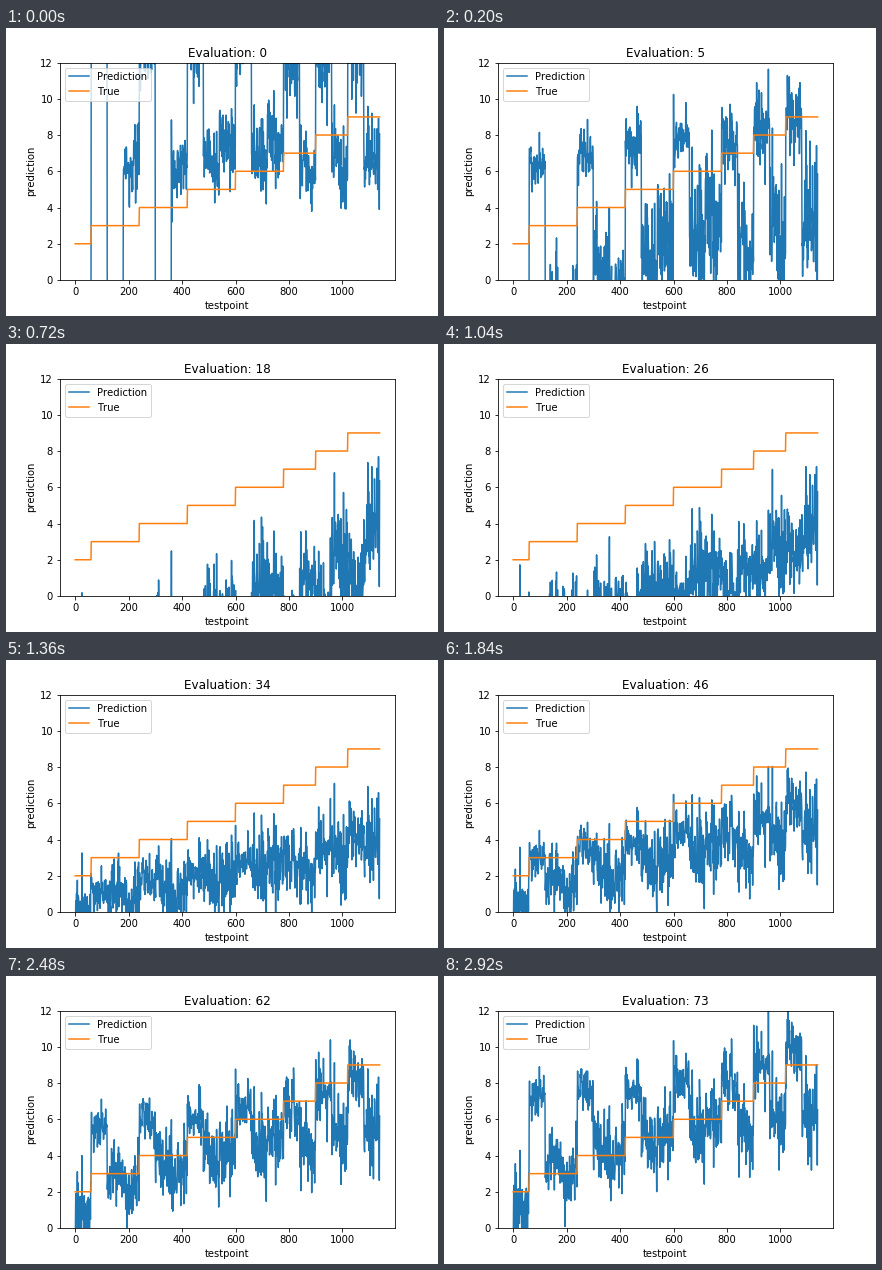
Animation, 432 px wide and 288 px high, one loop 2960 ms. Source, as a matplotlib script:

```python
import numpy as np
import matplotlib.pyplot as plt
from matplotlib.animation import FuncAnimation

EVALS, STEP_MS = 74, 40
SEG, N = 60, 1140
STARTS = np.array([0, 60, 240, 420, 600, 780, 900, 1020])
PEAKS = [25, 98, 360, 600, 670, 955, 1095, 1135]
DIPS = [580, 750, 885, 995]

x = np.arange(N)
level = np.searchsorted(STARTS, x, side='right') - 1
truth = level + 2
d = level - 1
since = x - STARTS[level]
fresh = (since < SEG) & (level > 0)     # first stretch after each step
stuck = ~fresh & (since < 2 * SEG) & (level < 3)
drift = np.where(level < 3, 1, -1) * ((since % 120) / 120 - .5) * ~fresh

# Stages of training: mean after a step, mean elsewhere, drift, noise gains
STAGES = [
    (12.8 + 2 * (d == 0), np.where(stuck, -5, 7), 2, 1.5, .9),
    (6.5 + .4 * d, 3.8 - 6 * .6 ** d, 2.5, 1.1, 1.6),
    (-6 + 1.1 * d, -3 + 1.05 * d, -1, 1.3, 1.25),
    (1.2 + .5 * d, .9 + .5 * d, 1, .9, 1),
    (7.4 + .07 * d ** 2, 7 - 3.8 * .7 ** d, 1.5, 1, 1),
]
STAGE_EVALS = [0, 5, 18, 34, 73]


def stage_curves(after, other, drift_gain, fresh_gain, other_gain):
    mean = np.where(fresh, after, other) + drift_gain * drift
    spread = np.where(fresh, fresh_gain * (.5 + .09 * d), other_gain * 1.05)
    return np.array([mean, spread])


def make_noise(rng):
    white = rng.standard_t(6, N) * .75
    slow = np.convolve(rng.normal(size=N), np.ones(7) / 7 ** .5, 'same')
    return np.clip(white + .45 * slow, -3, 3)


rng = np.random.default_rng(7)
noise_a, noise_b = make_noise(rng), make_noise(rng)
curves = [stage_curves(*stage) for stage in STAGES]


def predict(n):
    pos = np.interp(n, STAGE_EVALS, range(len(STAGES)))
    i = min(int(pos), len(STAGES) - 2)
    mean, spread = curves[i] + (pos - i) * (curves[i + 1] - curves[i])
    turn = n / EVALS
    z = np.cos(turn) * noise_a + np.sin(turn) * noise_b
    z[PEAKS], z[DIPS] = 3, -2.6
    return mean + spread * z


plt.rcParams['text.kerning_factor'] = 6
fig, ax = plt.subplots(figsize=(6, 4), dpi=72)
fig.subplots_adjust(left=.125, right=.9, bottom=.125, top=.88)
pred_line, = ax.plot(x, predict(0), color='#1f77b4', label='Prediction')
ax.plot(x, truth, color='#ff7f0e', label='True')
ax.set_xlim(-.05 * (N - 1), 1.05 * (N - 1))
ax.set_ylim(0, 12)
ax.set_xlabel('testpoint')
ax.set_ylabel('prediction')
ax.legend(loc='upper left')
title = ax.set_title('Evaluation: 0')


def update(n):
    pred_line.set_ydata(predict(n))
    title.set_text(f'Evaluation: {n}')
    return pred_line, title


anim = FuncAnimation(fig, update, frames=EVALS, interval=STEP_MS,
                     repeat=True, repeat_delay=0)
plt.show()
```
